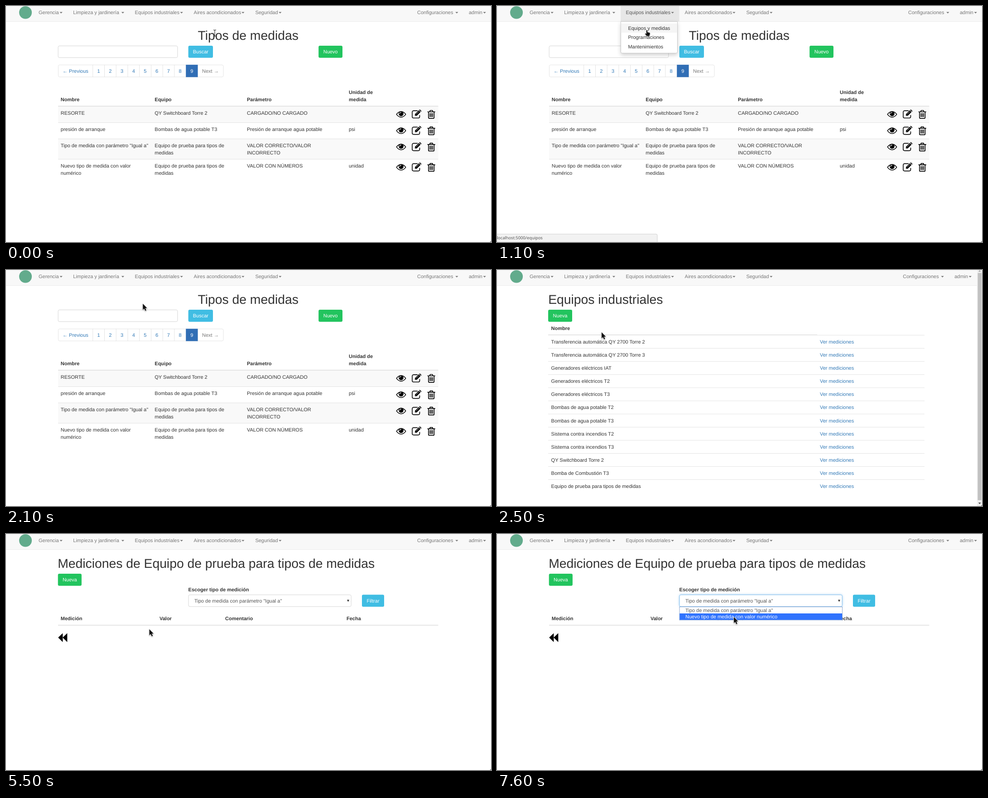
An HTML page for the animation above (8 s loop, 1071 by 523 pixels).

```html
<!DOCTYPE html>
<html lang="es">
<head>
<meta charset="utf-8">
<title>Equipos y medidas</title>
<style>
html, body { margin: 0; width: 100%; height: 100%; overflow: hidden; background: #fff; }
svg { display: block; width: 100vw; height: 100vh; }
text { font: 11px "Liberation Sans", Arial, sans-serif; fill: #333; text-rendering: geometricPrecision; }
.b { font-weight: bold; }
.h1 { font-size: 28.3px; }
.nav { fill: #777; }
.grey { fill: #555; }
.muted { fill: #777; }
.white { fill: #fff; }
.link { fill: #337ab7; }
.mid { text-anchor: middle; }
.status { font: 9.28px "Noto Sans", sans-serif; fill: #555; }
</style>
</head>
<body>
<svg id="stage" viewBox="0 0 1071 523"></svg>
<script>
const LOOP = 8000, STEP = 100;
const GREEN = '#22c45e', BLUE = '#40bde3', LINE = '#ddd';

// y is the visual middle of a line of body text
const text = (x, y, s, cls = '') => `<text x="${x}" y="${y + 3.9}" class="${cls}">${s}</text>`;
const title = (x, s, cls = '') => `<text x="${x}" y="74.6" class="h1 ${cls}">${s}</text>`;
const rect = (x, y, w, h, fill, more = '') =>
  `<rect x="${x}" y="${y}" width="${w}" height="${h}" fill="${fill}" ${more}/>`;
const path = (d, more = '') => `<path d="${d}" ${more}/>`;
const group = (id, body, more = '') => `<g id="${id}" ${more}>${body}</g>`;
const at = (x, y, body) => `<g transform="translate(${x} ${y})">${body}</g>`;
const button = (x, y, w, label, fill) =>
  rect(x, y, w, 26.8, fill, 'rx="3"') + text(x + w / 2, y + 13.4, label, 'white mid');
const field = (x, y, w, id) =>
  rect(x + .4, y + .4, w - .8, 26, '#fff', `id="${id}" rx="3" stroke="#ccc" stroke-width=".8"`);
const caret = x => path(`M${x} 13.2h6.3l-3.15 3.2z`, 'fill="#777"');
const menu = (x, label, caretX, id = '') =>
  `<text id="${id}" x="${x}" y="18.4" class="nav">${label}</text>` + caret(caretX);

const ink = w => `fill="none" stroke="#000" stroke-width="${w}" stroke-linejoin="round"`;
const eye =
  path('M-10.2 0Q-5.6-6.3 0-6.3T10.2 0Q5.6 6.3 0 6.3T-10.2 0Z', ink(1.6)) +
  '<circle cy="-1.4" r="5.3"/>' +
  path('M-3.1-1.5A3.1 3.1 0 0 1 0-4.6', 'fill="none" stroke="#fff" stroke-width="1.2" stroke-linecap="round"');
const edit =
  path('M2-7.2H-7a3 3 0 0 0-3 3V6a3 3 0 0 0 3 3H3.5a3 3 0 0 0 3-3V2.5', ink(1.6)) +
  path('M-4 4.2V.4L4.6-8.2 8.4-4.4-.2 4.2ZM5.4-9L7-10 10.6-6.4 9.3-5.1Z') +
  path('M-1.2.4L4.8-5.6M-3 2l1.4 1.4', 'stroke="#fff" stroke-width=".8"');
const trash =
  path('M-8.6-5.6H8.6M-3.6-6L-2.6-8.6H2.6L3.6-6M-6.2-5V7a2 2 0 0 0 2 2H4.2a2 2 0 0 0 2-2V-5M-2.9-2.6V6M0-2.6V6M2.9-2.6V6', ink(1.7));

function navbar() {
  return rect(0, 0, 1071, 34, '#f8f8f8') + rect(0, 34, 1071, .8, '#e7e7e7') +
    '<circle cx="43" cy="14.5" r="14" fill="#62ab8c"/>' +
    rect(273, 0, 129.5, 34, '#e7e7e7', 'id="navActive"') +
    menu(72, 'Gerencia', 118.5) + menu(148.3, 'Limpieza y jardinería', 254.8) +
    menu(284.5, 'Equipos industriales', 384.5, 'navEquipos') +
    menu(414.6, 'Aires acondicionados', 520.2) + menu(550.4, 'Seguridad', 602.2) +
    group('navRight', menu(908, 'Configuraciones', 992.3) + menu(1022, 'admin', 1053.6));
}

function typesPage() {
  const rows = [
    [222.3, 36.3, 'RESORTE', 'QY Switchboard Torre 2', 'CARGADO/NO CARGADO', ''],
    [258.6, 36, 'presión de arranque', 'Bombas de agua potable T3', 'Presión de arranque agua potable', 'psi'],
    [294.6, 45, 'Tipo de medida con parámetro "Igual a"', 'Equipo de prueba para tipos de|medidas', 'VALOR CORRECTO/VALOR|INCORRECTO', ''],
    [339.6, 45, 'Nuevo tipo de medida con valor|numérico', 'Equipo de prueba para tipos de|medidas', 'VALOR CON NÚMEROS', 'unidad']
  ];
  const columns = [120.8, 328.3, 532, 757];
  const lines = (x, y, s) => s.split('|').map((part, i) => text(x, y + i * 15.7, part)).join('');
  const table = rows.map(([y, h, ...cells], i) =>
    (i % 2 ? '' : rect(115, y, 839.5, h, '#f9f9f9')) +
    (i ? rect(115, y - .4, 839.5, .8, LINE) : '') +
    cells.map((s, c) => lines(columns[c], y + 14.6, s)).join('') +
    at(872.5, y + 17.8, eye) + at(907, y + 17, edit) + at(939.2, y + 17.8, trash)).join('');

  const cell = 25.74, first = 191.3;
  let pager = rect(115.4, 130.6, 364.6, 26.6, '#fff', `rx="3" stroke="${LINE}" stroke-width=".8"`) +
    text(125, 144, '← Previous', 'link') + text(433, 144, 'Next →', 'muted');
  for (let n = 1; n <= 9; n++) {
    const x = first + (n - 1) * cell;
    pager += n < 9 ? rect(x, 130.6, .8, 26.6, LINE) : rect(x, 130.2, cell + .6, 27.4, '#306eb5');
    pager += text(x + cell / 2 + .3, 144, n, 'mid ' + (n < 9 ? 'link' : 'white'));
  }

  return title(534.7, 'Tipos de medidas', 'mid') + field(114.7, 88, 264.5, 'search') +
    button(402.6, 88, 54.4, 'Buscar', BLUE) + button(690.2, 88, 52.8, 'Nuevo', GREEN) + pager +
    text(120.8, 207, 'Nombre', 'b') + text(328.3, 207, 'Equipo', 'b') + text(532, 207, 'Parámetro', 'b') +
    text(757, 191.2, 'Unidad de', 'b') + text(757, 207, 'medida', 'b') +
    table + rect(115, 221.2, 839.5, 1.5, LINE);
}

function equipmentPage() {
  const names = ['Transferencia automática QY 2700 Torre 2', 'Transferencia automática QY 2700 Torre 3',
    'Generadores eléctricos IAT', 'Generadores eléctricos T2', 'Generadores eléctricos T3',
    'Bombas de agua potable T2', 'Bombas de agua potable T3', 'Sistema contra incendios T2',
    'Sistema contra incendios T3', 'QY Switchboard Torre 2', 'Bomba de Combustión T3',
    'Equipo de prueba para tipos de medidas'];
  const list = names.map((name, i) => {
    const y = 159 + i * 29.1;
    return (i ? rect(113, y - 14.9, 831, .8, LINE) : '') + text(119.6, y, name) +
      group(i === 11 ? 'lastLink' : 'link' + i, text(713, y, 'Ver mediciones', 'link'));
  }).join('');
  return title(113.2, 'Equipos industriales') + button(113, 88, 53, 'Nueva', GREEN) +
    text(119.6, 129, 'Nombre', 'b') + rect(113, 143, 594, 1.5, LINE) + rect(707, 143.9, 237, .8, LINE) + list;
}

function scrollbar() {
  return rect(1060, 0, 11, 523, '#f1f1f1') + rect(1061.6, 6.5, 8.4, 503.5, '#c1c1c1', 'id="thumb"') +
    path('M1062.8 3.8h6l-3-3.2z', 'id="arrowUp"') + path('M1062.8 515.6h6l-3 3.2z', 'id="arrowDown"');
}

function measuresPage() {
  const heads = [[120.8, 'Medición'], [339, 'Valor'], [484, 'Comentario'], [752, 'Fecha']];
  const option = (id, y, s) => rect(403.3, y - 7.1, 358.8, 14.3, '#3073fd', `id="${id}Bg"`) +
    group(id, text(416, y, s));
  return title(114.2, 'Mediciones de Equipo de prueba para tipos de medidas') +
    button(114.7, 88, 52.2, 'Nueva', GREEN) + text(402.6, 123, 'Escoger tipo de medición', 'b') +
    field(402.6, 134.4, 360, 'select') + text(416, 148, 'Tipo de medida con parámetro "Igual a"', 'grey') +
    path('M753 145.8h5l-2.5 4.6z', 'fill="#333"') + button(786, 134.4, 49, 'Filtrar', BLUE) +
    heads.map(([x, s]) => text(x, 187.3, s, 'b')).join('') + rect(115, 201.4, 839.5, 1.5, LINE) +
    path('M115.2 229.6L125.3 219.8V239.4ZM125.2 229.6L135.3 219.8V239.4Z') +
    group('options', rect(403, 161.4, 359.4, 29.4, '#fff', 'stroke="#6d8fc4" stroke-width=".8"') +
      option('first', 168.7, 'Tipo de medida con parámetro "Igual a"') +
      option('second', 183.1, 'Nuevo tipo de medida con valor numérico'));
}

function dropdown() {
  const items = ['Equipos y medidas', 'Programaciones', 'Mantenimientos'];
  return path('M273.4 34.4H398.4V101.4a3 3 0 0 1-3 3H276.4a3 3 0 0 1-3-3Z',
    'fill="#fff" stroke="#bbb" stroke-width=".8" style="filter:drop-shadow(0 4px 4px rgba(0,0,0,.18))"') +
    rect(273.8, 38.8, 124.2, 20.4, '#f5f5f5', 'id="itemHover"') +
    items.map((s, i) => text(289.4, 49 + i * 20.4, s)).join('');
}

const statusBar = path('M-1 505.4H351a3 3 0 0 1 3 3V524H-1Z', 'fill="#f2f2f2" stroke="#c6c6c6" stroke-width=".8"') +
  '<text id="statusText" x="-.3" y="517.4" class="status"></text>';

const outline = 'fill="#111" stroke="#fff" stroke-width="1.4" paint-order="stroke" stroke-linejoin="round"';
const shadow = 'style="filter:drop-shadow(.6px 1px .8px rgba(0,0,0,.35))"';
const pointers =
  group('arrow', path('M0 0V13.4L3 10.7 5.3 15.8 7.7 14.7 5.4 9.8H9.4Z', outline), shadow) +
  group('hand', path('M-1.2 1q1.2-1.6 2.3 0V5l4.2.9q1.6.4 1.5 2L6.3 10.6 5.4 13.4H-.4L-4 8.8q0-1.5 1.4-1L-1.2 9Z', outline), shadow) +
  group('beam', path('M-3-7Q-.5-7 0-6 .5-7 3-7M0-6V6M-3 7Q-.5 7 0 6 .5 7 3 7',
    'fill="none" stroke="#222" stroke-width="1.1"'));

const stage = document.getElementById('stage');
stage.innerHTML = group('types', typesPage()) + group('equipment', equipmentPage()) +
  group('measures', measuresPage()) + navbar() + group('dropdown', dropdown()) +
  group('scroll', scrollbar()) + rect(1069, 522, 2, 1, '#444') +
  group('status', statusBar) + group('pointer', pointers);

const $ = id => document.getElementById(id);
const show = (id, on) => { $(id).style.display = on ? '' : 'none'; };

// pointer stops: time, x, y
const stops = [[0, 461, 60], [100, 461, 60], [500, 338, 14], [700, 338, 14], [1100, 331, 53],
  [1800, 331, 53], [2000, 320, 59], [2500, 231, 138]];
// sudden jumps after the smooth part
const jumps = [[5100, 424.5, 320], [5500, 316.5, 211], [6100, 652, 180], [6600, 587.5, 139],
  [7100, 560, 155.5], [7600, 523, 184]];

function pointerAt(t) {
  const jump = jumps.filter(j => j[0] <= t).pop();
  if (jump) return jump.slice(1);
  const i = stops.findIndex(s => s[0] > t);
  if (i < 0) return stops[stops.length - 1].slice(1);
  const [t0, x0, y0] = stops[i - 1], [t1, x1, y1] = stops[i];
  const k = (t - t0) / (t1 - t0);
  return [x0 + (x1 - x0) * k, y0 + (y1 - y0) * k];
}

function draw(time) {
  const t = Math.floor(time / STEP) * STEP;
  const within = (a, b) => t >= a && t < b;
  const onList = within(2300, 5500), scrolled = within(5100, 5500);

  show('types', t < 2300);
  show('equipment', onList);
  show('measures', t >= 5500);
  show('scroll', onList);
  $('navRight').setAttribute('transform', `translate(${onList ? -11.8 : 0} 0)`);

  show('navActive', within(800, 1500));
  show('dropdown', within(800, 1500));
  show('itemHover', within(1000, 1500));
  $('navEquipos').style.fill = within(800, 1500) ? '#555' : within(400, 1600) ? '#333' : '';

  show('status', within(1000, 1900) || scrolled);
  $('statusText').textContent = 'localhost:5000/equipos' + (scrolled ? '/22/mediciones' : '');

  $('equipment').setAttribute('transform', `translate(0 ${scrolled ? -1.5 : 0})`);
  const last = $('lastLink').firstChild;
  last.style.fill = scrolled ? '#23527c' : '';
  last.style.textDecoration = scrolled ? 'underline' : '';
  $('thumb').setAttribute('y', scrolled ? 8 : 6.5);
  $('arrowUp').setAttribute('fill', scrolled ? '#444' : '#a3a3a3');
  $('arrowDown').setAttribute('fill', scrolled ? '#a3a3a3' : '#444');

  const open = t >= 7100, onSecond = t >= 7600;
  show('options', open);
  $('select').setAttribute('stroke', open ? '#66afe9' : '#ccc');
  $('select').style.filter = open ? 'drop-shadow(0 0 2.5px rgba(102,175,233,.6))' : '';
  show('firstBg', !onSecond);
  show('secondBg', onSecond);
  $('first').firstChild.style.fill = onSecond ? '#555' : '#fff';
  $('second').firstChild.style.fill = onSecond ? '#fff' : '#555';

  const kind = t < 300 ? 'beam' : within(400, 1900) ? 'hand' : 'arrow';
  ['beam', 'hand', 'arrow'].forEach(k => show(k, k === kind));
  const [x, y] = pointerAt(t);
  $('pointer').setAttribute('transform', `translate(${x} ${y})`);
}

const start = performance.now();
function tick() {
  draw((performance.now() - start) % LOOP);
  requestAnimationFrame(tick);
}
tick();
</script>
</body>
</html>
```
